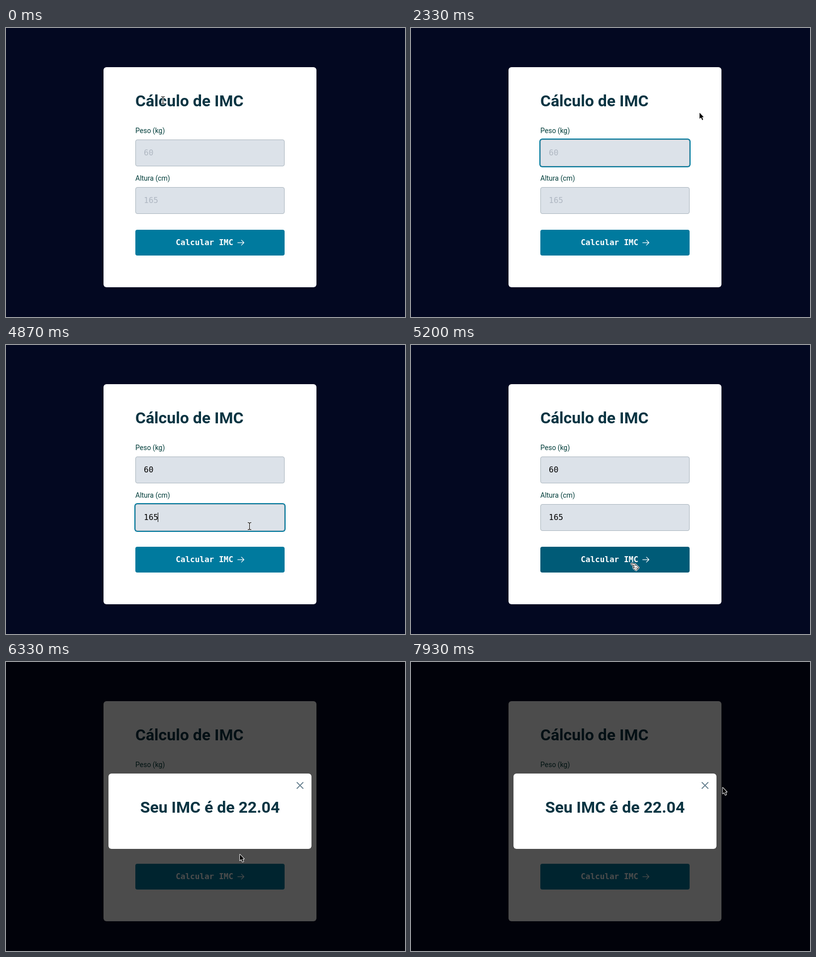
These frames come from a looping animation (802 by 583 pixels, 8000 ms). An HTML page with a canvas:

```html
<!DOCTYPE html>
<html lang="pt-BR">
<head>
<meta charset="utf-8">
<title>Cálculo de IMC</title>
<style>
  html, body { margin: 0; width: 100%; height: 100%; overflow: hidden; background: #030821; }
  #stage { position: absolute; left: 0; top: 0; width: 802px; height: 583px; overflow: hidden; background: #030821; }
  #stage * { position: absolute; box-sizing: border-box; white-space: pre; }
  .card { background: #fff; border-radius: 6px; }
  #form { left: 196px; top: 79px; width: 428px; height: 444px; }
  h1 { margin: 0; font: 700 32px/38px Roboto, sans-serif; color: #0a3442; }
  #form h1 { left: 64px; top: 49px; }
  label { left: 64px; font: 400 14px/16px Roboto, sans-serif; color: #003d3a; }
  .field { left: 64px; width: 300px; height: 54px; border: 1px solid #a9b4bd; border-radius: 4px;
    background: #dce2e9; font: 16px/19px "DejaVu Sans Mono", monospace; color: #000; }
  .field.focus { box-shadow: 0 0 0 2px #007a9e; }
  .field.empty span { color: #afb7c2; }
  .field span { left: 16px; top: 16px; }
  .field i { top: 16px; width: 1px; height: 19px; background: #000; }
  #button { left: 64px; top: 328px; width: 300px; height: 52px; border-radius: 4px; background: #007a9e;
    font: 700 16px/19px "DejaVu Sans Mono", monospace; color: #fff; }
  #button.hover { background: #005b77; }
  #button span { left: 81.2px; top: 16px; }
  svg { fill: none; stroke-linecap: round; stroke-linejoin: round; }
  #button svg { left: 204px; top: 19px; }
  #shade { left: 0; top: 0; width: 802px; height: 583px; background: rgba(0, 0, 0, .7); }
  #modal { left: 206px; top: 225px; width: 408px; height: 152px; }
  #modal h1 { left: 0; top: 49px; width: 408px; text-align: center; }
  #modal svg { left: 377px; top: 16px; }
  canvas { left: 0; top: 0; }
</style>
</head>
<body>
<div id="stage">
  <div id="form" class="card">
    <h1>Cálculo de IMC</h1>
    <label style="top:120px">Peso (kg)</label>
    <div class="field" id="weight" style="top:146px"><span></span><i></i></div>
    <label style="top:216px">Altura (cm)</label>
    <div class="field" id="height" style="top:242px"><span></span><i></i></div>
    <div id="button"><span>Calcular IMC</span>
      <svg width="16" height="14" stroke="#fff" stroke-width="1.25"><path d="M1.7 7H14.3M9.2 1.9L14.3 7L9.2 12.1"/></svg>
    </div>
  </div>
  <div id="shade">
    <div id="modal" class="card">
      <h1>Seu IMC é de 22.04</h1>
      <svg width="16" height="16" stroke="#6c8593" stroke-width="1.9"><path d="M2 2L14 14M14 2L2 14"/></svg>
    </div>
  </div>
  <canvas id="pointer" width="802" height="583"></canvas>
</div>
<script>
const LOOP = 8000, STEP = 1000 / 15;
const $ = id => document.getElementById(id);
const ctx = $('pointer').getContext('2d');

// Pointer moves: first step, last step, then a cubic path
const moves = [
  [3, 4, [315, 145], [340, 170], [370, 215], [389, 242]],
  [20, 24, [389, 242], [470, 190], [565, 130], [580, 171]],
  [68, 77, [580, 171], [560, 250], [470, 400], [442.5, 440.5]],
  [94, 105, [442.5, 440.5], [560, 185], [780, 212], [644, 467]],
  [107, 109, [644, 467], [646, 466], [648, 464], [650, 463]],
  [112, 119, [650, 463], [920, 350], [400, 160], [626.5, 253.5]]
];

// Typed value and caret state from a given time on
const weightKeys = [[0, '', 0], [1070, '', 1], [2330, '', 0], [2400, '6', 1], [2600, '60', 1], [3000, '60', 0]];
const heightKeys = [[0, '', 0], [3000, '', 1], [3600, '1', 1], [3930, '16', 1], [4200, '16', 0], [4270, '165', 1], [5200, '165', 0]];

const inside = ([x, y], l, t, r, b) => x >= l && x < r && y >= t && y < b;

function pointerAt(step) {
  let pos = moves[0][2];
  for (const [from, to, a, b, c, d] of moves) {
    if (step < from) break;
    const k = Math.min(1, (step - from + 1) / (to - from + 1));
    const u = k * k * (3 - 2 * k), v = 1 - u;
    pos = a.map((p, i) => v * v * v * p + 3 * v * v * u * b[i] + 3 * v * u * u * c[i] + u * u * u * d[i]);
  }
  return pos;
}

function cursorKind(pos, open) {
  if (open) return inside(pos, 580, 238, 602, 260) ? 'hand' : 'arrow';
  if (inside(pos, 260, 407, 560, 459)) return 'hand';
  const overText = inside(pos, 260, 130, 477, 166) || inside(pos, 260, 225, 560, 279) || inside(pos, 260, 321, 560, 375);
  return overText ? 'beam' : 'arrow';
}

const arrow = new Path2D('M0 0V12L3 9.4L5.3 14.8L7.2 14L5 8.8H8.4Z');
const beam = new Path2D('M-3 -6.5H-1L0.5 -5.5L2 -6.5H4M0.5 -5.5V6.5M-3 7.5H-1L0.5 6.5L2 7.5H4');
const hand = new Path2D('M0 0.5L1.5 -0.3L8 1.2L15.5 8.7L10 14.5L4.5 10L4 8.2L6 7.8L4 6.2L3.8 4.6L5.5 4.2L0.8 2.4Z');
const fingers = new Path2D('M5.5 4.2L8 5.2M6 7.8L8.2 8.8M8 2.8L10.2 5M10.8 12L14 8.8M9 10.4L12 7.4');

function paint(path, color, width) {
  ctx.strokeStyle = color;
  ctx.lineWidth = width;
  ctx.stroke(path);
}

const cursors = {
  arrow() {
    paint(arrow, '#fff', 2);
    ctx.fillStyle = '#000';
    ctx.fill(arrow);
  },
  beam() {
    paint(beam, '#fff', 3);
    paint(beam, '#000', 1.2);
  },
  hand() {
    paint(hand, '#fff', 2.6);
    ctx.fillStyle = '#fff';
    ctx.fill(hand);
    paint(hand, '#000', 1);
    paint(fingers, '#000', 1);
  }
};

function setField(id, keys, hint, t, focused) {
  const [, value, caret] = keys.filter(k => k[0] <= t).pop();
  const el = $(id), [text, bar] = el.children;
  el.classList.toggle('empty', !value);
  el.classList.toggle('focus', focused);
  text.textContent = value || hint;
  bar.style.display = caret ? 'block' : 'none';
  bar.style.left = 16 + Math.floor(value.length * 9.633) + 'px';
}

function draw(now) {
  const step = Math.floor((now % LOOP + 5) / STEP) % 120;
  const t = step * STEP + 5;
  const open = t >= 5330;
  const pos = pointerAt(step);

  setField('weight', weightKeys, '60', t, t >= 1070 && t < 3000);
  setField('height', heightKeys, '165', t, t >= 3000 && t < 5200);
  $('button').classList.toggle('hover', t < 5400 && inside(pos, 260, 407, 560, 459));
  $('shade').style.display = open ? 'block' : 'none';

  ctx.clearRect(0, 0, 802, 583);
  ctx.save();
  ctx.translate(...pos);
  ctx.lineJoin = 'round';
  cursors[cursorKind(pos, open)]();
  ctx.restore();
}

const start = performance.now();
function tick() {
  draw(performance.now() - start);
  requestAnimationFrame(tick);
}
tick();
</script>
</body>
</html>
```
